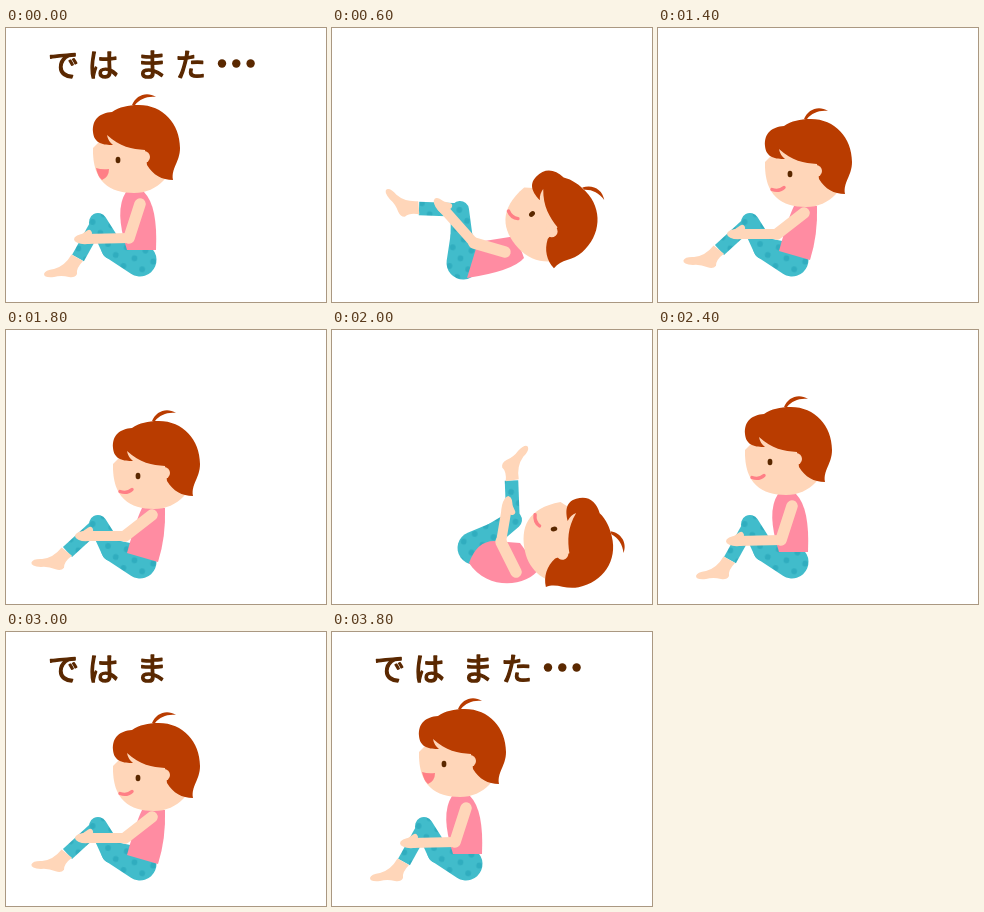
These frames come from a looping animation (320x274 px, 4 s). An HTML page:

```html
<!DOCTYPE html>
<html lang="ja">
<head>
<meta charset="utf-8">
<style>
html, body { margin: 0; width: 100%; height: 100%; overflow: hidden; background: #fff; }
svg { display: block; width: 320px; height: 274px; }
.skin { fill: #ffd6b9; }
.hair { fill: #b93c00; }
.pink { fill: #ff8ca2; }
.pants { fill: url(#polka); stroke: none; }
.shin { fill: none; stroke: url(#polka); stroke-width: 13.5; }
.arm { fill: none; stroke: #ffd6b9; stroke-linecap: round; stroke-linejoin: round; }
.smile { fill: none; stroke: #ff7f86; stroke-width: 3.4; stroke-linecap: round; }
.open { fill: #ff7f86; }
.dark { fill: #5a2800; }
text { font: 400 31px "Noto Sans CJK JP", "Noto Sans CJK", sans-serif; text-anchor: middle;
  stroke: #5a2800; stroke-width: 1.4; stroke-linejoin: round; }
</style>
</head>
<body>
<svg viewBox="0 0 320 274">
  <defs>
    <pattern id="polka" width="19" height="19" patternUnits="userSpaceOnUse" patternTransform="rotate(10)">
      <rect width="19" height="19" fill="#41bccb"/>
      <g fill="#30adbf"><circle cx="5" cy="5" r="2.9"/><circle cx="14.5" cy="14.5" r="2.9"/></g>
    </pattern>
    <g id="head">
      <path class="skin" d="M87 120C86 154 104 165 128 165C152 165 169 146 169 122L128 79Z"/>
      <path class="hair" d="M87 104C86 91 94 85 106 84C113 79 123 77 131 77C156 76 174 95 174 120C174 134 165 140 167 152C156 152 147 147 141 137L139 122C126 121 114 119 101 107Q102 113 107 117C98 117 88 116 87 104Z"/>
      <path class="hair" d="M126 77C130 67 141 63 150 69C141 68 134 71 129 77Z"/>
      <circle class="skin" cx="138" cy="129" r="6"/>
      <ellipse class="dark" cx="112" cy="132" rx="2.4" ry="3.3"/>
    </g>
    <path id="foot" class="skin" d="M-6.5 -3.5L5 3Q-2 10 -1 16Q-3 20 -9 19Q-17 17 -24 19Q-34 20 -34 16Q-33 12 -24 11Q-13 8 -6.5 -3.5Z"/>
    <g id="hand" class="skin">
      <ellipse rx="11" ry="5.2"/>
      <path class="arm" stroke-width="6" d="M2 2L-4 6"/>
    </g>
  </defs>
  <g id="figure"></g>
  <g id="words" class="dark"></g>
</svg>
<script>
const STEP = 200;
const ORDER = "SSURLSRLSLURSRULSSSS"; // S sit, L lean, R rolled back, U legs up

// Joints of each pose; sag bends the thigh, turns are in degrees
const POSES = {
  S: {
    eye: [112, 132], headTurn: 0, footTurn: 0, sag: 10,
    hip: [134, 232], knee: [92, 194], cuff: [72, 230],
    shoulder: [134, 176], elbow: [123, 210], hand: [79, 211],
    torso: "M120 164Q108 182 121 222H150Q152 178 138 164Z"
  },
  L: {
    eye: [132, 146], headTurn: 0, footTurn: 9, sag: 10,
    hip: [134, 232], knee: [92, 194], cuff: [61.5, 222],
    shoulder: [146, 185], elbow: [119, 206], hand: [80, 206],
    torso: "M136 178Q130 190 121 223L152 232Q160 207 159 178Z"
  },
  R: {
    eye: [200, 186], headTurn: 48, footTurn: 56, sag: 0,
    hip: [131, 235], knee: [128, 182], cuff: [87, 180.5],
    shoulder: [173, 224], elbow: [142, 215], hand: [110, 179],
    torso: "M135 250L146 214L184 208L192 230Q181 243 135 250Z"
  },
  U: {
    eye: [222, 199], headTurn: 78, footTurn: 141, sag: 0,
    hip: [142, 218], knee: [181, 190], cuff: [179.5, 150.5],
    shoulder: [184, 242], elbow: [169, 212], hand: [175, 177],
    torso: "M137 233Q145 211 162 211L188 213L207 239C196 256 156 262 137 233Z"
  }
};

const LETTERS = [["で", 57.5], ["は", 97], ["ま", 145.5], ["た", 184.5]];
const WORDS = [
  ...LETTERS.map(([letter, x]) => `<text x="${x}" y="48">${letter}</text>`),
  ...[0, 1, 2].map(i => `<circle cx="${216 + 14.3 * i}" cy="35.5" r="4.2"/>`)
];

const path = (kind, d, width = "") => `<path class="${kind}" d="${d}" stroke-width="${width}"/>`;
const line = (...points) => "M" + points.join("L");
const place = (id, [x, y], turn) => `<use href="#${id}" transform="translate(${x} ${y}) rotate(${turn})"/>`;

// Outline of two circles joined by their outer tangents
function taper([ax, ay], ra, [bx, by], rb) {
  const along = Math.atan2(by - ay, bx - ax);
  const spread = Math.acos((ra - rb) / Math.hypot(bx - ax, by - ay));
  const rim = (x, y, r, side) =>
    [x + r * Math.cos(along + side * spread), y + r * Math.sin(along + side * spread)];
  return `M${rim(ax, ay, ra, 1)}A${ra} ${ra} 0 1 1 ${rim(ax, ay, ra, -1)}` +
    `L${rim(bx, by, rb, -1)}A${rb} ${rb} 0 0 1 ${rim(bx, by, rb, 1)}Z`;
}

function leg({ hip, knee, cuff, sag, footTurn }) {
  const dx = hip[0] - knee[0], dy = hip[1] - knee[1];
  const bend = sag / Math.hypot(dx, dy);
  const middle = [(hip[0] + knee[0]) / 2 - dy * bend, (hip[1] + knee[1]) / 2 + dx * bend];
  return path("pants", taper(hip, 16.5, middle, 11)) + path("pants", taper(middle, 11, knee, 9)) +
    path("shin", line(knee, cuff)) + place("foot", cuff, footTurn);
}

function arm({ shoulder, elbow, hand }) {
  const turn = Math.atan2(hand[1] - elbow[1], hand[0] - elbow[0]) * 180 / Math.PI;
  return path("arm", line(shoulder, elbow), 11.5) + path("arm", line(elbow, hand), 10) +
    place("hand", hand, turn);
}

function head({ eye, headTurn }, talking) {
  const mouth = talking
    ? path("open", "M90 140Q96 142 103 141Q103 149 96 152Q92 149 90 140Z")
    : path("smile", "M94 147.5Q101 150 106 145.5");
  return `<g transform="translate(${eye}) rotate(${headTurn}) translate(-112 -132)"><use href="#head"/>${mouth}</g>`;
}

const figure = document.getElementById("figure");
const words = document.getElementById("words");
const start = performance.now();
let shown = -1;

function draw() {
  const beat = Math.floor((performance.now() - start) / STEP) % ORDER.length;
  if (beat !== shown) {
    shown = beat;
    const count = beat ? Math.max(0, beat - 12) : WORDS.length;
    const pose = POSES[ORDER[beat]];
    figure.innerHTML = leg(pose) + path("pink", pose.torso) + arm(pose) + head(pose, count > 3);
    words.innerHTML = WORDS.slice(0, count).join("");
  }
  requestAnimationFrame(draw);
}
draw();
</script>
</body>
</html>
```
